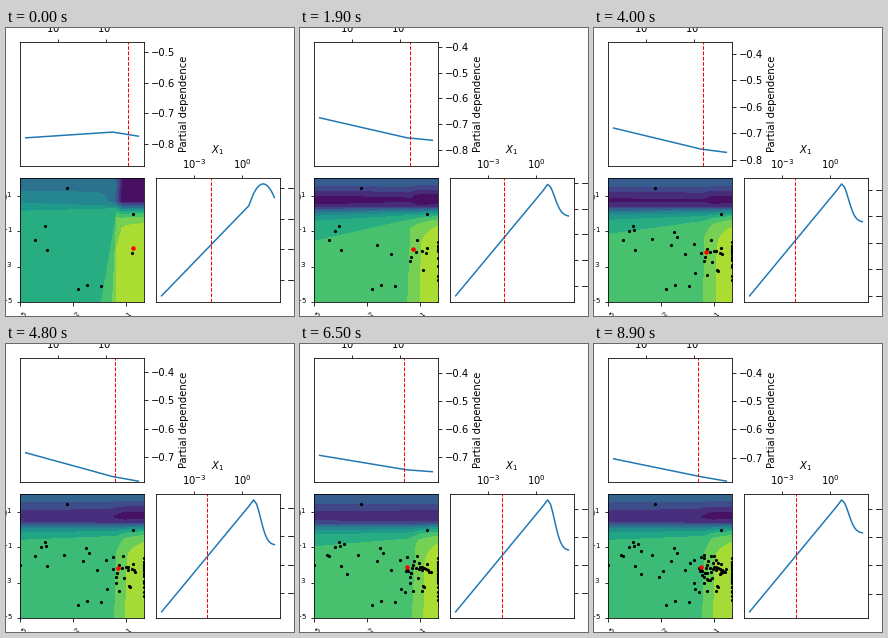
Write a matplotlib script that moves like this. It is 288 px wide and 288 px high and loops after 9 s.

```python
import numpy as np
import matplotlib.pyplot as plt
from matplotlib.animation import FuncAnimation
from matplotlib.ticker import FixedLocator, MultipleLocator, NullLocator

FRAMES, STEP = 90, 100
SIZE, SIDE = 288, 124
LO, HI = -5, 2  # decades

START = [(-2.35, 1.44), (-3.59, -.71), (-4.15, -1.5), (-3.48, -2.06), (1.38, -.03),
         (1.32, -2.23), (-1.22, -4.04), (-1.73, -4.27), (-.43, -4.1)]

# Iteration at which each new best point is found, in decades.
BEST = {0: (1.356, -1.935), 12: (.611, -1.997), 27: (.549, -2.183), 53: (.238, -2.12)}

grid = np.linspace(10.0 ** LO, 10.0 ** HI, 40)
log_grid = np.log10(grid)
kink = log_grid[1]


def best_at(i):
    return BEST[max(s for s in BEST if s <= i)]


def sample_points():
    rng = np.random.default_rng(12)
    points = START + [BEST[0]]
    for i in range(1, FRAMES):
        edge = .12 + .6 * np.exp(-i / 30)
        kind = rng.random()
        if i in BEST:
            point = BEST[i]
        elif kind < edge:
            point = LO if rng.random() < .12 else HI, rng.normal(-2.7, .9)
        elif kind < edge + .14:
            point = rng.uniform(-4.3, -.3), rng.uniform(-2.9, -.8)
        else:
            point = min(rng.normal(.75, .55), HI), rng.normal(-2.4, .5)
        points.append(point)
    return 10 ** np.array(points, float)


def smoothstep(x, a, b):
    s = np.clip((x - a) / (b - a), 0, 1)
    return s * s * (3 - 2 * s)


def phases(i):
    """Initial transient, mid-run refit and slow drift of the model."""
    return np.exp(-i / 6), smoothstep(i, 36, 44), np.cos(2 * np.pi * (i - 48) / 41)


def surface(i):
    early, late, drift = phases(i)
    floor = np.interp(log_grid, [LO, kink, .9, HI],
                      [.31 + .015 * (1 - late) + .035 * early,
                       .215 + .045 * late - .05 * early,
                       .17 + .01 * late - .05 * early,
                       .1 + .02 * late])
    ridge = np.interp(log_grid, [LO, kink, .8],
                      [1 - .12 * late - .48 * early,
                       .94 - late * (.03 - .01 * drift) - .26 * early,
                       1 - late * (.07 - .03 * drift)])
    top = .67 + early * np.interp(log_grid, [LO, kink, .8], [-.03, -.03, .29])
    v = grid[:, None] / 100
    fade = top + (ridge - top) * np.exp(-(v - .05) / .2)
    rise = floor + (ridge - floor) * (.87 - .27 * early) * v / v[1]
    return np.clip(np.where(v > .04, fade, rise), .001, .999)


def limits(i):
    early, late, _ = phases(i)
    return -.787 - .073 * (1 - late) - .012 * early, -.345 - .122 * np.exp(-i / 16)


def curve_x0(i):
    early, _, drift = phases(i)
    ends = [-.66 - .0005 * i - .12 * early, -.755 - .013 * drift, -.766 - .018 * drift]
    return np.interp(log_grid, [LO, kink, HI], ends)


def curve_x1(i):
    early = phases(i)[0]
    peak = .952
    tail = .62 + .08 * np.cos(2 * np.pi * (i - 26) / 70)
    settled = tail + (peak - tail) * np.exp(-((log_grid - log_grid[2]) / .6) ** 2)
    settled[1] = .9
    hump = peak - .18 * ((log_grid - 1.3) / .9) ** 2
    h = early * hump + (1 - early) * settled
    h[0] = .05
    lo, hi = limits(i)
    return lo + h * (hi - lo)


def log_axis(axis, decades):
    axis.set_major_locator(FixedLocator([10.0 ** d for d in decades]))
    axis.set_minor_locator(NullLocator())


def panel(left, top):
    rect = (left, SIZE - top - SIDE, SIDE, SIDE)
    ax = fig.add_axes([r / SIZE for r in rect])
    ax.set_xscale("log")
    return ax


def diagonal(left, top, label):
    ax = panel(left, top)
    pad = .05 * (HI - LO)
    ax.set_xlim(10 ** (LO - pad), 10 ** (HI + pad))
    log_axis(ax.xaxis, [-3, 0])
    ax.xaxis.tick_top()
    ax.xaxis.set_label_position("top")
    ax.set_xlabel(label)
    ax.yaxis.tick_right()
    ax.yaxis.set_label_position("right")
    ax.set_ylabel("Partial dependence")
    ax.yaxis.set_major_locator(MultipleLocator(.1))
    curve, = ax.plot([], [], lw=1.5)
    mark = ax.axvline(1, color="r", ls="--", lw=1)
    return ax, curve, mark


plt.rcParams.update({"font.family": "DejaVu Sans", "font.size": 10})
fig = plt.figure(figsize=(4, 4), dpi=72, facecolor="white")

diagonals = [diagonal(14, 14, "$X_0$"), diagonal(150, 150, "$X_1$")]

joint = panel(14, 150)
joint.set_yscale("log")
joint.set_xlim(10.0 ** LO, 10.0 ** HI)
joint.set_ylim(10.0 ** LO, 10.0 ** HI)
log_axis(joint.xaxis, [-5, -2, 1])
log_axis(joint.yaxis, [-5, -3, -1, 1])
joint.tick_params(axis="x", labelrotation=45)
dots = joint.scatter([], [], c="k", s=10, lw=0, zorder=3)
best_dot = joint.scatter([], [], c="r", s=20, lw=0, zorder=4)

points = sample_points()
filled = []


def draw(i):
    while filled:
        filled.pop().remove()
    _, late, drift = phases(i)
    bands = 11 if late > .5 and drift > 0 else 12
    filled.append(joint.contourf(grid, grid, surface(i), np.linspace(0, 1, bands + 1),
                                 cmap="viridis_r", zorder=1))
    best = 10 ** np.array(best_at(i))
    dots.set_offsets(points[:len(START) + 1 + i])
    best_dot.set_offsets([best])
    for (ax, curve, mark), y, x in zip(diagonals, (curve_x0(i), curve_x1(i)), best):
        ax.set_ylim(*limits(i))
        curve.set_data(grid, y)
        mark.set_xdata([x, x])
    return []


anim = FuncAnimation(fig, draw, frames=FRAMES, interval=STEP,
                     init_func=lambda: [], repeat=True, repeat_delay=0)
plt.show()
```
